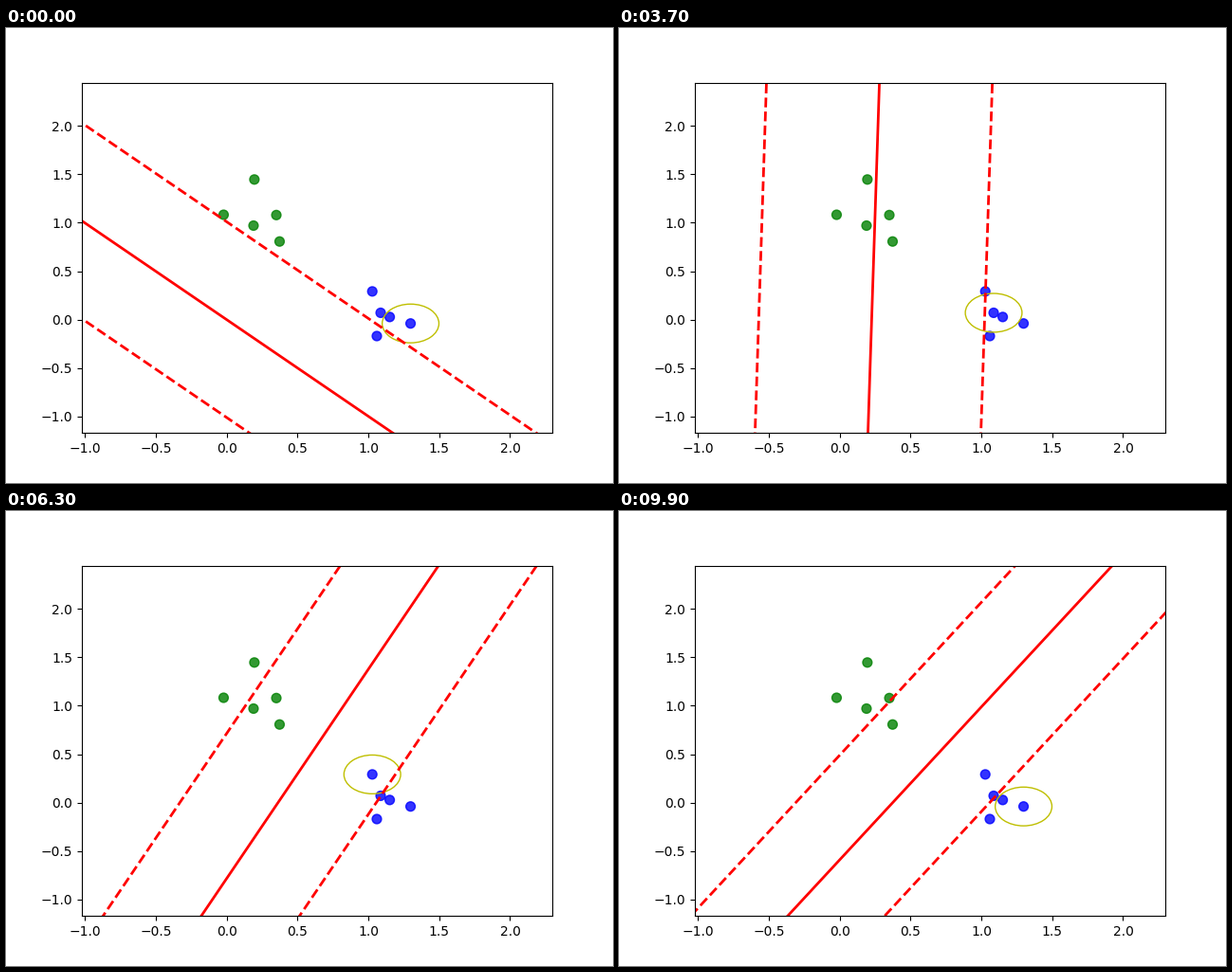
Write a matplotlib script that moves like this. It is 640 px wide and 480 px high and loops after 10 s.

```python
"""Linear SVM trained by stochastic gradient descent, one sample per frame."""
from itertools import pairwise

import numpy as np
import matplotlib.pyplot as plt
from matplotlib.animation import FuncAnimation

FRAMES, INTERVAL = 100, 100
RATE, DECAY = 0.05, 0.1

green = [(-0.021, 1.082), (0.196, 1.446), (0.351, 1.079), (0.19, 0.97), (0.374, 0.806)]
blue = [(1.028, 0.291), (1.087, 0.07), (1.151, 0.027), (1.298, -0.04), (1.06, -0.17)]
points = np.array(green + blue)
labels = np.repeat([-1, 1], 5)

# step: (sample index, w1, w2, bias); SGD runs between these
keys = {
    0: (8, 0.988, 0.99, 0),
    22: (6, 1.152, 0.337, -0.211),
    37: (6, 1.255, -0.028, -0.284),
    47: (4, 1.322, -0.406, -0.505),
    63: (5, 1.443, -0.668, -0.524),
    83: (6, 1.504, -0.796, -0.472),
    99: (8, 1.462, -0.926, -0.548),
}


def sample_order():
    """Shuffled epochs that visit the key samples on time."""
    rng = np.random.default_rng(3)
    n = len(points)
    epochs = np.array([rng.permutation(n) for _ in range(FRAMES // n)])
    for t, (sample, *_) in keys.items():
        epoch, i = epochs[t // n], t % n
        j = np.flatnonzero(epoch == sample)[0]
        epoch[[i, j]] = epoch[[j, i]]
    return epochs.ravel()


def sgd_step(state, i):
    x = np.append(points[i], 1)
    violated = labels[i] * (state @ x) < 1
    return state * (1 - RATE * DECAY) + violated * RATE * labels[i] * x


def train(order):
    """Run SGD from key to key, spreading the leftover drift evenly."""
    path = []
    for (t0, start), (t1, end) in pairwise(keys.items()):
        run = [np.array(start[1:])]
        for i in order[t0 + 1:t1 + 1]:
            run.append(sgd_step(run[-1], i))
        drift = np.array(end[1:]) - run[-1]
        path[t0:] = run + np.linspace(0, 1, len(run))[:, None] * drift
    return path


order = sample_order()
path = train(order)

fig, ax = plt.subplots(figsize=(6.4, 4.8), dpi=100)
ax.scatter(*points.T, s=50, c=np.where(labels < 0, "g", "b"), alpha=0.8)
ring = ax.add_patch(plt.Circle((0, 0), 0.2, color="y", fill=False))
span = np.array([-5.0, 5.0])
margins = {level: ax.plot(span, span, "r--" if level else "r-", lw=2)[0]
           for level in (-1, 0, 1)}
(x0, y0), (x1, y1) = points.min(axis=0) - 1, points.max(axis=0) + 1
ax.set(xlim=(x0, x1), ylim=(y0, y1))


def update(t):
    w1, w2, bias = path[t]
    ring.center = points[order[t]]
    for level, line in margins.items():
        line.set_ydata((level - bias - w1 * span) / w2)
    return [ring, *margins.values()]


anim = FuncAnimation(fig, update, frames=FRAMES, interval=INTERVAL,
                     repeat=True, repeat_delay=0)
plt.show()
```
